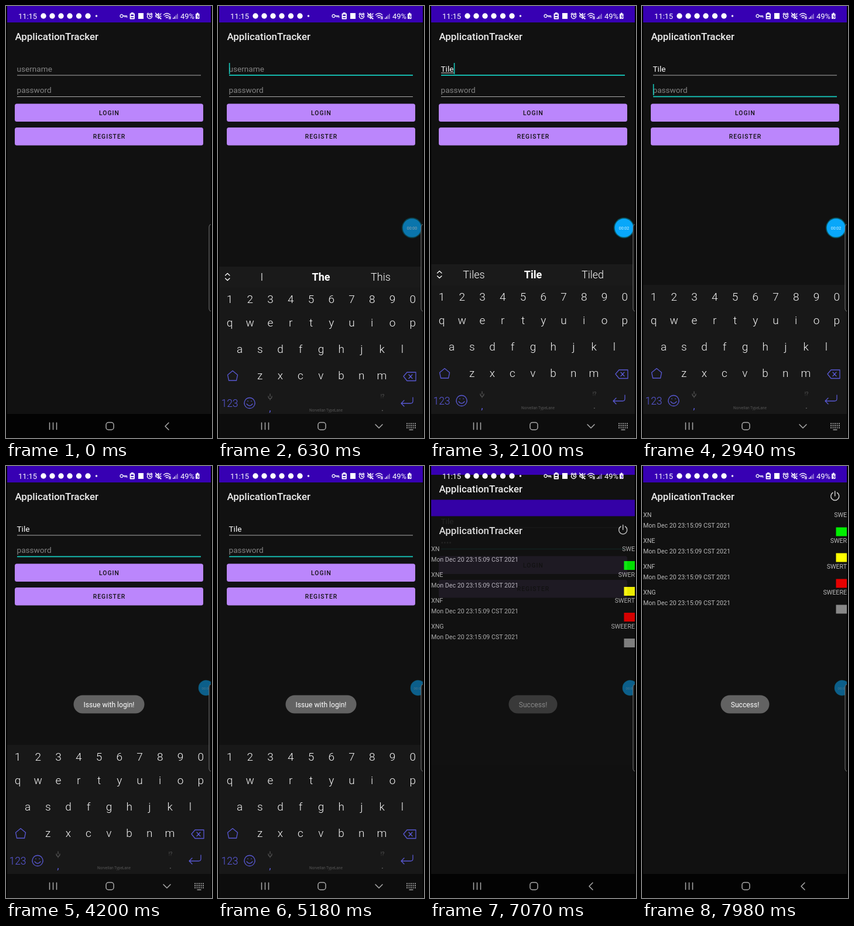
Animation, 352 px wide and 736 px high, one loop 8 s. Source, as an HTML page:

```html
<!DOCTYPE html>
<html lang="en">
<head>
<meta charset="utf-8">
<title>Login demo</title>
<style>
  html, body { margin: 0; width: 100%; height: 100%; overflow: hidden; background: #000; }
  svg { display: block; width: 100%; height: 100%; font-family: Roboto, sans-serif; fill: #fff; }
  .line { fill: none; stroke: #fff; stroke-width: 1.3; stroke-linecap: round; stroke-linejoin: round; }
  .title { font-size: 16.9px; font-weight: 500; fill: #eee; }
  .input { font-size: 13.6px; }
  .hint { fill: #858585; }
  .mid { text-anchor: middle; }
  .button { font-size: 10.3px; font-weight: 500; letter-spacing: 1.1px; fill: #111; }
  .list { font-size: 10.65px; fill: #bbb; }
  .key { font-size: 19px; font-weight: 300; fill: #f4f4f4; }
  .accent { stroke: #5858d2; }
  .toast { font-size: 12.1px; }
</style>
</head>
<body>
<svg viewBox="0 0 352 736">
  <clipPath id="screen"><rect x="2" width="348" height="695"/></clipPath>
  <rect width="352" height="736" fill="#000"/>
  <g clip-path="url(#screen)">
    <g id="login"></g>
    <g id="list"></g>
    <g id="keyboard"></g>
  </g>
  <g id="nav"></g>
  <g id="status"></g>
  <g id="toast" class="toast mid">
    <rect id="toastBox" y="390.5" height="31" rx="15.5" fill="#626262"/>
    <text id="toastText" x="176" y="410.5"></text>
  </g>
  <g clip-path="url(#screen)">
    <g id="bubble" class="mid">
      <circle id="bubbleRing" fill="#075966"/>
      <circle id="bubbleDisc" fill="#08a7fa"/>
      <text id="timer" y="2.5" font-size="7" fill="#d8f2ff"></text>
    </g>
    <path class="line" d="M352 372h-1q-4 0-4 5v138q0 5 4 5h1" style="fill:#111;stroke:#777;stroke-width:1"/>
  </g>
</svg>
<script>
const LOOP = 8000, STEP = 70;
const USER = 'Tile', PASSWORD = 'desk';
const userKeys = [1330, 1610, 1820, 2100];
const passKeys = [5320, 5600, 5880, 6160];
const suggestions = [
  ['I', 'The', 'This'], ['The', 'T', 'This'], ['Time', 'Ti', 'Tired'],
  ['Till', 'Til', 'Tile'], ['Tiles', 'Tile', 'Tiled']
];

const el = id => document.getElementById(id);
const text = (x, y, s, cls = '', extra = '') => `<text x="${x}" y="${y}" class="${cls}" ${extra}>${s}</text>`;
const rect = (x, y, w, h, fill, extra = '') => `<rect x="${x}" y="${y}" width="${w}" height="${h}" fill="${fill}" ${extra}/>`;
const line = (d, cls = '', extra = '') => `<path class="line ${cls}" d="${d}" ${extra}/>`;
const dot = (x, y, r, fill = '#fff') => `<circle cx="${x}" cy="${y}" r="${r}" fill="${fill}"/>`;
const ramp = (t, a, b) => Math.min(1, Math.max(0, (t - a) / (b - a)));
const easeOut = p => 1 - (1 - p) ** 3;
const show = (node, on) => node.setAttribute('visibility', on ? 'visible' : 'hidden');
const move = (node, x, y) => node.setAttribute('transform', `translate(${x} ${y})`);
const set = (node, attrs) => { for (const k in attrs) node.setAttribute(k, attrs[k]); };

const page = () => rect(2, 0, 348, 736, '#111') + rect(2, 0, 348, 28, '#3700b3') +
  text(15.5, 58, 'ApplicationTracker', 'title');

const button = (y, label) => rect(15, y, 322, 30.5, '#bb86fc', 'rx="3.5"') +
  text(176.5, y + 19, label, 'button mid');

const field = (id, y, hint) => text(18.5, y, hint, 'input hint', `id="${id}Hint"`) +
  text(18.5, y, '', 'input', `id="${id}Text"`) +
  `<rect id="${id}Line" x="19" width="314"/>` +
  `<rect id="${id}Caret" y="${y - 15}" width="1.6" height="19" fill="#16c9bc"/>`;

el('login').innerHTML = page() + field('user', 112, 'username') + field('pass', 148, 'password') +
  rect(19, 113.5, 0, 1, '#ddd', 'id="composing"') + button(166.5, 'LOGIN') + button(207, 'REGISTER');

const jobs = [['XN', 'SWE', '#00f000'], ['XNE', 'SWER', '#ffff00'], ['XNF', 'SWERT', '#e60000'], ['XNG', 'SWEERE', '#888']];
el('list').innerHTML = page() +
  line('M326 45.5a7 7 0 1 0 7.5 0M329.7 43v8', '', 'style="stroke:#ccc;stroke-width:1.5"') +
  jobs.map(([name, role, color], i) => {
    const y = 44 * i;
    return text(2, 87 + y, name, 'list') + text(350, 87 + y, role, 'list', 'text-anchor="end"') +
      text(2, 105.3 + y, 'Mon Dec 20 23:15:09 CST 2021', 'list') + rect(331.5, 104.5 + y, 19, 15, color);
  }).join('');

const keyRow = (keys, x, y) => [...keys].map((k, i) => text(x + 34.75 * i, y, k, 'key mid')).join('');
el('keyboard').innerHTML = rect(2, 475, 348, 220, '#181818') +
  `<g id="suggest">${rect(2, 440, 348, 36, '#1a1a1a')}${line('M12.5 455l3.7-3.5 3.7 3.5M12.5 460l3.7 3.5 3.7-3.5')}` +
  [75, 176, 278].map((x, i) => text(x, 463.5, '', 'mid', `id="word${i}" font-size="18" font-weight="${i === 1 ? 700 : 300}"`)).join('') + '</g>' +
  keyRow('1234567890', 20, 502) + keyRow('qwertyuiop', 20, 542) +
  keyRow('asdfghjkl', 37, 587) + keyRow('zxcvbnm', 71.5, 632) +
  line('M16.5 624.5l8.5-7 8.5 7-2 9.5h-13z', 'accent') +
  line('M317 627l6-7h15v14.5h-15zM326 624l6 6.5m0-6.5l-6 6.5', 'accent') +
  text(20, 679, '123', 'mid', 'font-size="17.5" font-weight="300" style="fill:#5c5ce0"') +
  line('M54 663.5a9 9 0 1 0 .01 0M49 674q5 6 10 0M51 669v.5M57 669v.5', 'accent') +
  line('M89 657v4M86 661q0 4 3 4t3-4M89 665v2', '', 'style="stroke:#555"') +
  text(89, 687, ',', 'mid', 'font-size="17" style="fill:#5c5ce0"') +
  text(184.5, 686.5, 'Norvellan TypeLane', 'mid', 'font-size="6.5" style="fill:#555"') +
  text(281, 664, '!?', 'mid', 'font-size="9" style="fill:#555"') +
  text(281, 686, '.', 'mid', 'font-size="15" style="fill:#777"') +
  line('M333 663v6q0 4-4 4h-16m5-5l-5 5 5 5', 'accent');

const gray = 'style="stroke:#aaa;stroke-width:1.5"';
el('nav').innerHTML = '<rect id="navBack" x="2" y="695" width="348" height="41"/>' +
  line('M74.5 710v11.5M80.5 710v11.5M86.5 710v11.5', '', gray) +
  `<rect class="line" x="171" y="709.5" width="13" height="12.5" rx="4" ${gray}/>` +
  `<g id="back">${line('M278 710l-6 6 6 6', '', gray)}</g>` +
  `<g id="hide">${line('M269 713l6 6 6-6', '', gray)}` +
  line('M322 711.5h16M322 715h16M322 718.5h16', '', 'style="stroke:#999;stroke-width:2;stroke-dasharray:2 1.5;stroke-linecap:butt"') +
  line('M327 722h6', '', 'style="stroke:#999"') + '</g>';

el('status').innerHTML = text(21, 21.5, '11:15', '', 'font-size="12.9"') +
  [64, 79, 94, 109, 124.5, 140].map(x => dot(x, 17, 4.7)).join('') + dot(154.5, 17, 1.7) +
  line('M197.5 14.5a2.5 2.5 0 1 0 .01 0M200.5 17h6v2.5m-3-2.5v2') +
  line('M212.5 13.5h6.5v8h-6.5zM214.5 12h2.5M214 18h3.5', '', 'style="stroke-width:1.8"') +
  rect(226, 12, 9, 10, '#fff') +
  line('M245.5 13.5a4 4 0 1 0 .01 0M245.5 15.5v2.5h2M241 14l2-2M250 14l-2-2') +
  line('M256 15.5h2l3-3v9l-3-3h-2zM263 15l2-2M263 17.5h2M263 20l2 1.5M255.5 12l9 10') +
  line('M269.5 15q5.5-5 11 0M271.5 17.5q3.5-3 7 0M273.5 20q1.5-1.5 3 0M279 18v4m2-4v4') +
  [0, 1, 2, 3].map(i => rect(285 + 2.4 * i, 20 - 2.2 * i, 1.4, 2 + 2.2 * i, i < 2 ? '#fff' : '#a893dc')).join('') +
  text(298, 21.5, '49%', '', 'font-size="13"') +
  rect(324, 13, 6.5, 9, '#fff', 'rx="1"') + rect(326, 11.5, 2.5, 2, '#fff') +
  line('M328.5 15l-2 3h3l-2 3', '', 'style="stroke:#3700b3;stroke-width:1"');

function drawField(id, y, value, active, caretOn) {
  const node = el(id + 'Text');
  node.textContent = value;
  show(el(id + 'Hint'), !value);
  set(el(id + 'Line'), { y: active ? y - .5 : y, height: active ? 1.8 : 1, fill: active ? '#16c9bc' : '#aaa' });
  const width = value ? node.getComputedTextLength() : 0;
  el(id + 'Caret').setAttribute('x', 18.8 + width);
  show(el(id + 'Caret'), active && caretOn);
  return width;
}

function drawToast(label, halfWidth, opacity) {
  el('toastText').textContent = label;
  set(el('toastBox'), { x: 176 - halfWidth, width: 2 * halfWidth });
  el('toast').setAttribute('opacity', opacity);
}

function render(t) {
  const typed = keys => keys.filter(k => k <= t).length;
  const userCount = typed(userKeys), passCount = typed(passKeys);
  const onUser = t >= 350 && t < 2660, onPass = t >= 2660;
  const lastInput = Math.max(...[350, 2660, ...userKeys, ...passKeys].filter(k => k <= t), 0);
  const caretOn = (t - lastInput) % 1000 < 500;

  const userWidth = drawField('user', 117.5, USER.slice(0, userCount), onUser, caretOn);
  el('composing').setAttribute('width', onUser ? userWidth : 0);
  const fresh = passCount && t - passKeys[passCount - 1] < 700;
  const masked = '•'.repeat(passCount - (fresh ? 1 : 0)) + (fresh ? PASSWORD[passCount - 1] : '');
  drawField('pass', 154, masked, onPass, caretOn);

  // Keyboard
  const raised = easeOut(ramp(t, 420, 700)) * (1 - ramp(t, 6720, 6930));
  move(el('keyboard'), 0, 256 * (1 - raised));
  show(el('suggest'), t < 2730);
  suggestions[userCount].forEach((word, i) => el('word' + i).textContent = word);
  const open = raised > .3;
  el('navBack').setAttribute('fill', open ? '#0d0d0d' : '#030303');
  show(el('back'), !open);
  show(el('hide'), open);

  // Screen change
  move(el('login'), 0, -13 * ramp(t, 6930, 7070));
  move(el('list'), 0, 57.5 * (1 - easeOut(ramp(t, 7070, 7420))));
  el('list').setAttribute('opacity', t < 7140 ? .92 * ramp(t, 7000, 7070) : 1);

  if (t < 6500) drawToast('Issue with login!', 60.5, ramp(t, 3570, 3780) * (1 - .75 * ramp(t, 5810, 5950) - .25 * ramp(t, 5950, 6020)));
  else drawToast('Success!', 41.5, ramp(t, 6950, 7190));

  // Recording timer
  const docked = ramp(t, 3430, 3640);
  move(el('bubble'), 331.5 + 10.5 * docked, 378);
  el('bubble').setAttribute('opacity', ramp(t, 490, 700) * (1 - .48 * docked));
  el('bubbleRing').setAttribute('r', 17.5 - 4 * docked);
  el('bubbleDisc').setAttribute('r', 15.8 - 2.8 * docked);
  set(el('timer'), { 'font-size': 7 - docked, opacity: 1 - .4 * docked });
  el('timer').textContent = '00:0' + Math.floor(t / 1000);
}

function tick() {
  const t = performance.now() % LOOP;
  render(Math.floor(t / STEP) * STEP);
  requestAnimationFrame(tick);
}
tick();
</script>
</body>
</html>
```
